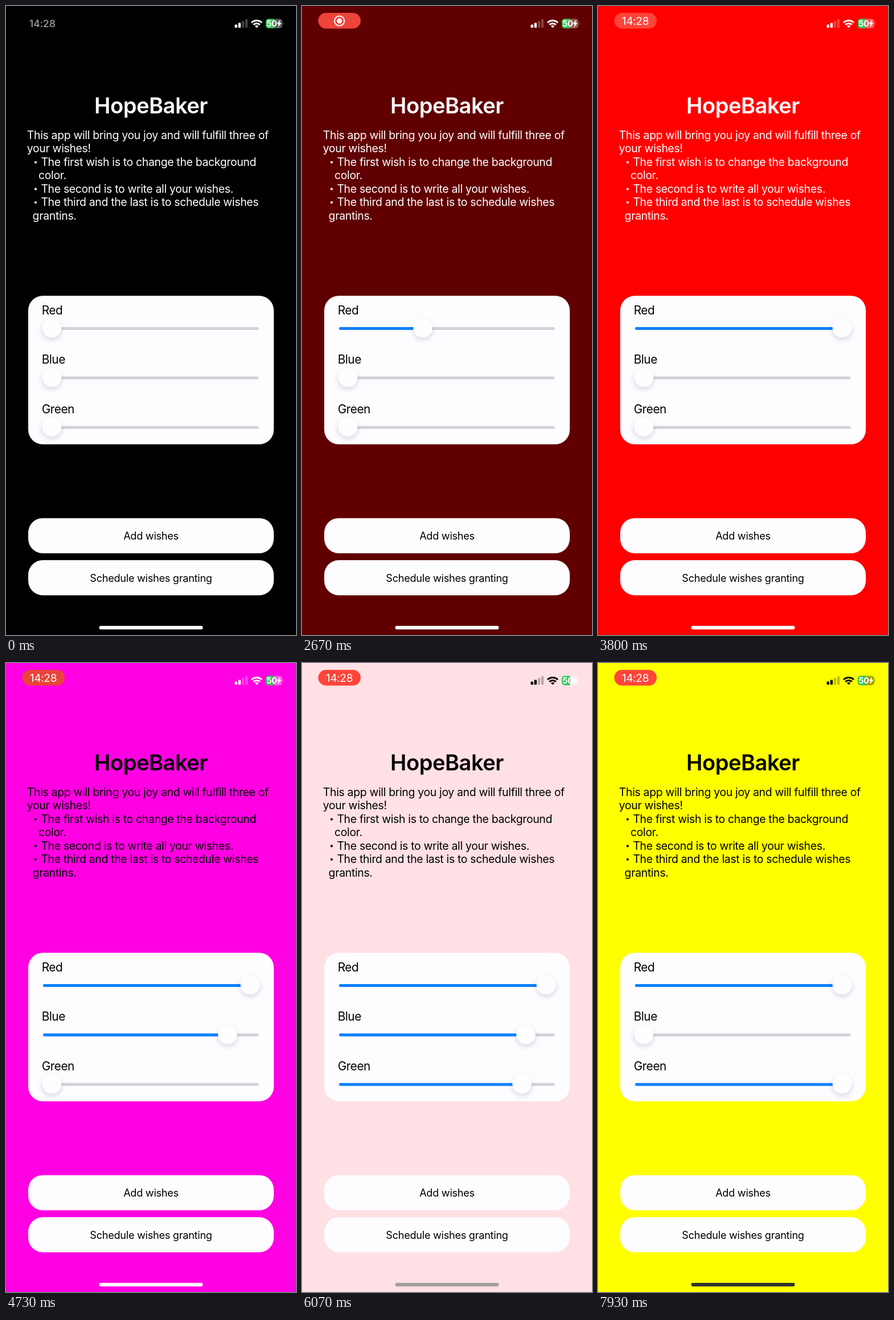
Write an HTML page that moves like this. It is 509 by 1101 pixels and loops after 8 s.

```html
<!DOCTYPE html>
<html lang="en">
<head>
<meta charset="utf-8">
<title>HopeBaker</title>
<style>
html, body { margin: 0; height: 100%; overflow: hidden; background: #000; }
svg { display: block; width: 100vw; height: 100vh; font-family: Inter, Roboto, sans-serif; }
.title { font-size: 38px; font-weight: 600; letter-spacing: -.012em; text-anchor: middle; }
.body { font-size: 19.43px; letter-spacing: -.017em; }
.label { font-size: 20.8px; letter-spacing: -.023em; }
.button { font-size: 18.1px; letter-spacing: -.014em; text-anchor: middle; }
.clock { font-size: 17.6px; font-weight: 600; letter-spacing: -.01em; text-anchor: middle; }
.pill-clock { font-size: 19.2px; letter-spacing: -.02em; text-anchor: middle; }
.percent { font-size: 14.5px; font-weight: 700; letter-spacing: -.03em; text-anchor: middle; }
</style>
</head>
<body>
<svg viewBox="0 0 509 1101">
  <defs>
    <filter id="shadow" x="-50%" y="-50%" width="200%" height="220%">
      <feDropShadow dx="0" dy="4" stdDeviation="4.5" flood-color="#302060" flood-opacity=".17"/>
    </filter>
    <clipPath id="cell"><rect x="456" y="22.5" width="29" height="16.5" rx="5"/></clipPath>
  </defs>
  <rect id="bg" width="509" height="1101"/>

  <text id="clock" class="clock" x="63.7" y="37" fill="#8d8d92">14:28</text>
  <g id="pill">
    <rect id="pillBox" x="28.5" y="12" width="74.5" height="27.5" rx="13.75"/>
    <g id="rec" fill="none" stroke="#fff" stroke-width="2">
      <circle cx="65.7" cy="26" r="8.6"/>
      <circle cx="65.7" cy="26" r="4.6" fill="#fff" stroke="none"/>
    </g>
    <text id="pillClock" class="pill-clock" x="65.5" y="33" fill="#fff">14:28</text>
  </g>

  <g id="status">
    <rect x="401.5" y="32.5" width="4.4" height="5.5" rx="1.2"/>
    <rect x="407.6" y="29.5" width="4.4" height="8.5" rx="1.2"/>
    <g opacity=".25">
      <rect x="413.7" y="26" width="4.4" height="12" rx="1.2"/>
      <rect x="419.8" y="23" width="4.4" height="15" rx="1.2"/>
    </g>
    <g fill="none" stroke="currentColor" stroke-width="2.9">
      <path d="M431 29.2a12.8 12.8 0 0 1 18 0M434.2 32.8a8.3 8.3 0 0 1 11.6 0"/>
    </g>
    <path d="M440 38.2l-3.2-3.3q3.2-2.5 6.4 0z"/>
  </g>
  <g id="battery">
    <g clip-path="url(#cell)">
      <rect x="456" y="22" width="29" height="18" opacity=".36"/>
      <rect x="456" y="22" width="14.5" height="18" fill="#34c759"/>
    </g>
    <path d="M486.4 28q2.2 2.7 0 5.4z" opacity=".4"/>
    <text class="percent" x="466.3" y="36" fill="#fff">50</text>
    <path d="M481.5 24l-6.5 7.6h3.6l-1.4 5.6 6.5-7.8h-3.6z" fill="#fff"/>
  </g>

  <g id="copy"><text class="title" x="254.5" y="187.5">HopeBaker</text></g>
  <rect x="39" y="507.3" width="431" height="260" rx="25.5" fill="#fdfcff"/>
  <g id="sliders"></g>
  <g id="buttons"></g>
  <rect id="home" x="163.5" y="1085" width="182" height="6.2" rx="3.1"/>
</svg>
<script>
const LOOP = 8000, FPS = 15;
const $ = id => document.getElementById(id);

function add(parent, tag, attrs, text = "") {
  const node = document.createElementNS("http://www.w3.org/2000/svg", tag);
  for (const key in attrs) node.setAttribute(key, attrs[key]);
  node.textContent = text;
  parent.append(node);
  return node;
}

const lines = [
  [36.8, "This app will bring you joy and will fulfill three of"],
  [36.8, "your wishes!"],
  [61.4, "The first wish is to change the background", true],
  [57, "color."],
  [61.4, "The second is to write all your wishes.", true],
  [61.4, "The third and the last is to schedule wishes", true],
  [46.6, "grantins."]
];
lines.forEach(([x, text, bullet], i) => {
  const y = 233 + i * 23.42;
  add($("copy"), "text", { class: "body", x, y }, text);
  if (bullet) add($("copy"), "circle", { cx: 52, cy: y - 6.3, r: 2.1 });
});

const sliders = ["Red", "Blue", "Green"].map((name, i) => {
  const g = add($("sliders"), "g", { transform: `translate(0 ${i * 86.6})` });
  const bar = { x: 65, y: 562, height: 5, rx: 2.5 };
  add(g, "text", { class: "label", x: 62.7, y: 539.8 }, name);
  add(g, "rect", { ...bar, width: 378.5, fill: "#d2d1d7" });
  return {
    fill: add(g, "rect", { ...bar, width: 0, fill: "#0a80ff" }),
    knob: add(g, "circle", { cy: 563.3, r: 16.8, fill: "#fefdff", filter: "url(#shadow)" })
  };
});

["Add wishes", "Schedule wishes granting"].forEach((text, i) => {
  const y = 896.4 + i * 73.6;
  add($("buttons"), "rect", { x: 39, y, width: 431, height: 61.5, rx: 25.5, fill: "#fdfcff" });
  add($("buttons"), "text", { class: "button", x: 254.5, y: y + 37.6 }, text);
});

// Eased value through [time, value] keys
function track(t, ...keys) {
  let [t0, v0] = keys[0];
  for (const [t1, v1] of keys) {
    if (t < t1) {
      const p = Math.max(0, (t - t0) / (t1 - t0));
      return v0 + (v1 - v0) * p * p * (3 - 2 * p);
    }
    [t0, v0] = [t1, v1];
  }
  return v0;
}

function setSlider({ fill, knob }, v) {
  const x = 80.5 + 348 * v;
  knob.setAttribute("cx", x);
  fill.setAttribute("width", v ? x - 65 : 0);
}

function draw(t) {
  const red = track(t, [1800, 0], [2670, .378], [3450, 1]);
  const blue = track(t, [3820, 0], [4800, .898], [6700, .898], [7750, 0]);
  const green = track(t, [5000, 0], [6070, .878], [6450, 1]);
  [red, blue, green].forEach((v, i) => setSlider(sliders[i], v));

  const rgb = [red, green, blue].map(v => Math.round(v * 255));
  const luma = .299 * red + .587 * green + .114 * blue;
  $("bg").setAttribute("fill", `rgb(${rgb})`);
  $("copy").setAttribute("fill", luma > .35 ? "#000" : "#fff");

  const ink = luma > .6 ? "#000" : "#fff";
  $("status").setAttribute("fill", ink);
  $("status").style.color = ink;
  $("battery").setAttribute("fill", t > 6250 ? "#000" : "#fff");
  const grey = track(t, [5850, 255], [6070, 160], [6300, 50]);
  $("home").setAttribute("fill", `rgb(${grey},${grey},${grey})`);

  const shown = track(t, [70, 0], [500, 1]);
  const timed = track(t, [2950, 0], [3250, 1]);
  const tone = track(t, [1800, 238], [2670, 238], [3600, 255], [3900, 255], [4730, 234], [6070, 255]);
  $("clock").setAttribute("opacity", 1 - shown);
  $("pill").setAttribute("opacity", shown);
  $("pillBox").setAttribute("fill", `rgb(${tone},68,58)`);
  $("rec").setAttribute("opacity", 1 - timed);
  $("pillClock").setAttribute("opacity", timed);
}

const start = performance.now();
function tick() {
  const t = (performance.now() - start) % LOOP;
  draw(Math.floor(t * FPS / 1000 + .05) * 1000 / FPS);
  requestAnimationFrame(tick);
}
tick();
</script>
</body>
</html>
```
